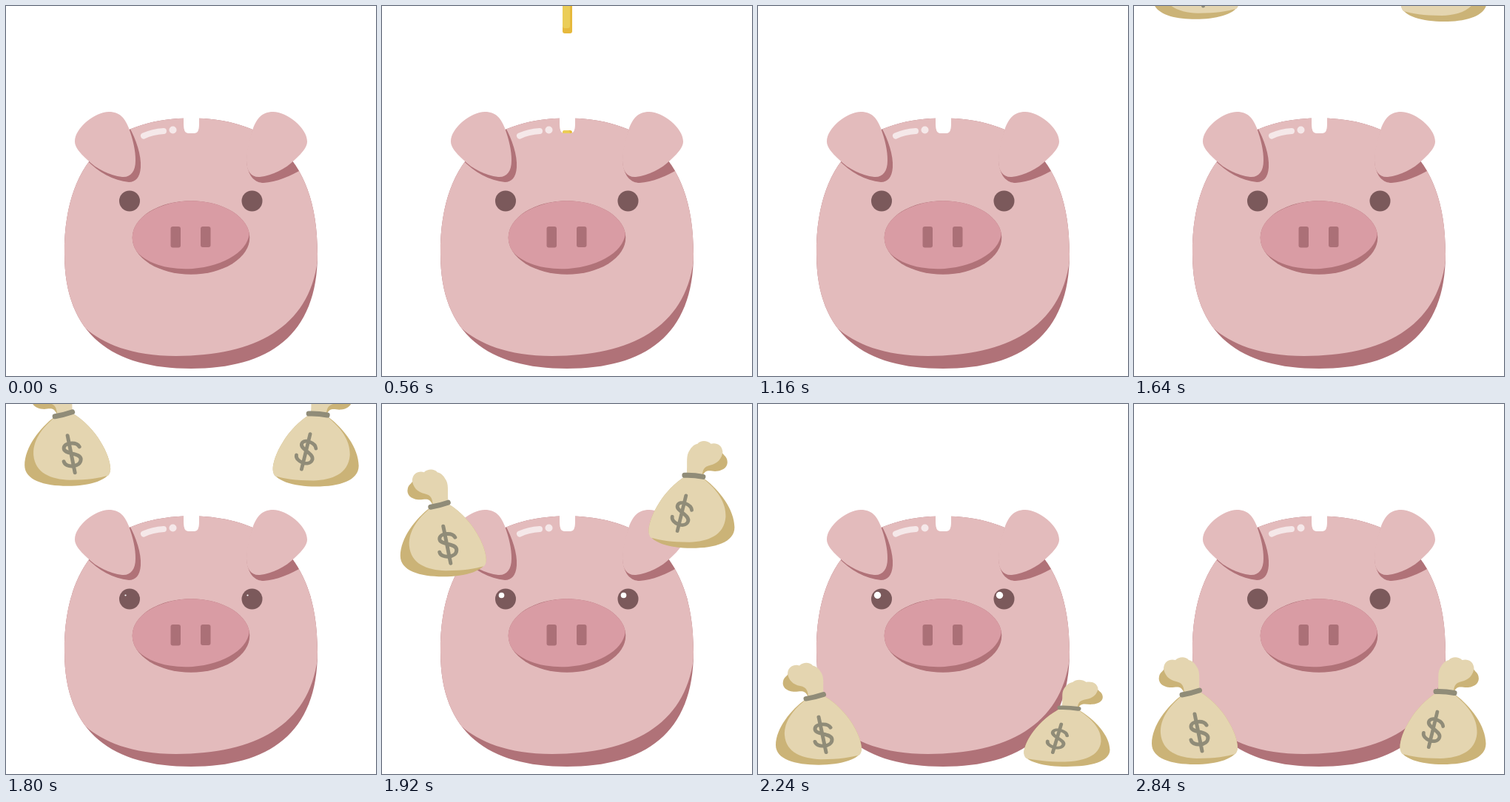
Recreate the animation shown at these times as an HTML page. Size 500 px wide and 500 px high, loop 2.88 s.

```html
<!DOCTYPE html>
<html lang="en">
<head>
<meta charset="utf-8">
<title>Piggy bank</title>
<style>
  html, body { margin: 0; width: 100%; height: 100%; overflow: hidden; background: #fff; }
  svg { display: block; width: 100vw; height: 100vh; }
  .skin { fill: #e3bbbc; }
  .shade { fill: #b07278; }
  .eye { fill: #7b595b; }
  .cloth { fill: #e4d5b0; }
  .fold { fill: #cbb377; }
  .ink { fill: none; stroke: #908c78; stroke-width: 5; stroke-linecap: round; }
  .tie { stroke-width: 7; }
  .shine { fill: none; stroke: #f5e8e9; stroke-width: 8; stroke-linecap: round; }
</style>
</head>
<body>
<svg viewBox="0 0 500 500">
  <defs>
    <path id="body" d="M250 151.5C343 151.5 421.500 196 421 335C421 445 355 490 250 490S79 445 79 335C78.500 196 157 151.5 250 151.5z"/>
    <clipPath id="inBody"><use href="#body"/></clipPath>
    <clipPath id="inSnout"><ellipse cx="250" cy="313" rx="79.3" ry="49.7"/></clipPath>
    <clipPath id="aboveSlot"><path d="M240 0V160Q240 172 246 172H255Q261 172 261 160V0z"/></clipPath>
    <path id="ear" class="skin" d="M93 183C93 165 120 143 139 143C155 143 161 153 166 165C172 182 175 195 175 209C175 224 168 232 157 231C140 229 122 220 110 208C98 197 93 190 93 183z"/>
    <g id="coin">
      <rect x="244" width="13" height="90" rx="3" fill="#e6b93c"/>
      <rect x="244" width="10" height="83" rx="3" fill="#ebcd57"/>
    </g>
    <g id="sack">
      <path class="fold" d="M68 391C63 378 56 384 48 383C38 382 32 376 34 368C35 362 41 361 42 354L78 362L89 389C121 408 140 446 140 464C140 479 112 487 82 487C50 487 24 479 24 459C24 435 45 408 64 394z"/>
      <path class="cloth" d="M68 390C67 382 66 377 57 375C47 373 41 366 40 357C41 347 49 344 56 346C61 341 70 341 74 346C81 348 83 352 86 357C90 365 87 374 89 389C121 408 140 446 140 464Q140 470 137 473C125 476 110 479 85 479C60 478 38 470 36 445C35 425 48 408 65 394z"/>
    </g>
    <path id="dollar" class="ink" d="M82 419L92 469M98 434C94 427 77 428 77 436C77 445 100 441 100 451C100 462 79 463 77 454"/>
  </defs>

  <use href="#body" class="shade"/>
  <g clip-path="url(#inBody)">
    <path class="skin" d="M422 335C414 432 340 473 230 473C170 473 130 456 107 435L0 400V0H422z"/>
    <path class="shade" d="M166 163C176 180 183 202 182 218C181 232 175 238 166 238C145 236 125 225 108 207z"/>
    <path class="shade" d="M333.500 167C328 188 324.500 202 325.500 214C328 231 337 239 348 239C365 238 385 230 402 219.500L390 205z"/>
  </g>
  <path d="M240 148V160Q240 172 246 172H255Q261 172 261 160V148z" fill="#fff"/>
  <use href="#ear"/>
  <use href="#ear" transform="matrix(-1 0 0 1 500 0)"/>
  <path class="shine" d="M186 175.500Q198 170 213 169"/>
  <circle cx="225.500" cy="167.500" r="5" fill="#f5e8e9"/>

  <circle class="eye" cx="167" cy="263.500" r="14"/>
  <circle class="eye" cx="332.500" cy="263.500" r="14"/>
  <circle class="glint" cx="161.500" cy="258.500" fill="#fff"/>
  <circle class="glint" cx="326.500" cy="258.500" fill="#fff"/>

  <g clip-path="url(#inSnout)">
    <rect class="shade" x="170" y="262" width="160" height="102"/>
    <ellipse cx="249" cy="309" rx="80" ry="46" fill="#d99ca4" transform="rotate(-4 249 309)"/>
  </g>
  <rect x="222.500" y="298" width="13.500" height="28.500" rx="3" fill="#ab7077"/>
  <rect x="263" y="298" width="13.500" height="28" rx="3" fill="#ab7077"/>

  <g clip-path="url(#aboveSlot)">
    <use href="#coin" class="coin"/>
    <use href="#coin" class="coin"/>
    <use href="#coin" class="coin"/>
  </g>

  <g class="bag">
    <use href="#sack"/>
    <path class="ink tie" d="M65 393Q77 391 88.500 387"/>
    <use href="#dollar"/>
  </g>
  <g class="bag">
    <use href="#sack" transform="matrix(-1 0 0 1 499.500 0)"/>
    <path class="ink tie" d="M408 388.500Q420 388 433 390.500"/>
    <use href="#dollar" transform="translate(404.500 440) rotate(25) scale(.96) translate(-87.500 -444)"/>
  </g>
</svg>
<script>
  const LOOP = 2880, STEP = 40, FLOOR = 487, COIN = 90;
  const coins = document.querySelectorAll('.coin');
  const bags = document.querySelectorAll('.bag');
  const glints = document.querySelectorAll('.glint');
  const clamp = x => Math.min(1, Math.max(0, x));

  const drops = [
    { speed: .442, pull: 2.8e-6, lands: 465 },
    { speed: .525, pull: 8.2e-7, lands: 596 }
  ];

  function draw(t) {
    coins.forEach((coin, i) => {
      const age = Math.max(0, t - 140 - 296 * i);
      const y = .165 * age + .00107 * age ** 2 - COIN;
      coin.setAttribute('transform', `translate(0 ${Math.min(y, 200)})`);
    });

    bags.forEach((bag, i) => {
      const { speed, pull, lands } = drops[i];
      const age = Math.max(0, t - 1600);
      const bottom = Math.min(FLOOR, speed * age + pull * age ** 3);
      const drift = 1.5 * (1 - bottom / FLOOR);
      const squash = .28 * Math.sin(Math.PI * clamp((age - lands) / 185));
      bag.setAttribute('visibility', t < 1600 ? 'hidden' : 'visible');
      bag.setAttribute('transform',
        `translate(${drift} ${bottom + 16 * squash}) scale(1 ${1 - squash}) translate(0 ${-FLOOR})`);
    });

    const glint = clamp((t - 1750) / 210) - clamp((t - 2600) / 230);
    glints.forEach(g => g.setAttribute('r', 4.7 * glint));
  }

  function tick() {
    const t = performance.now() % LOOP;
    draw(t - t % STEP);
    requestAnimationFrame(tick);
  }
  tick();
</script>
</body>
</html>
```
